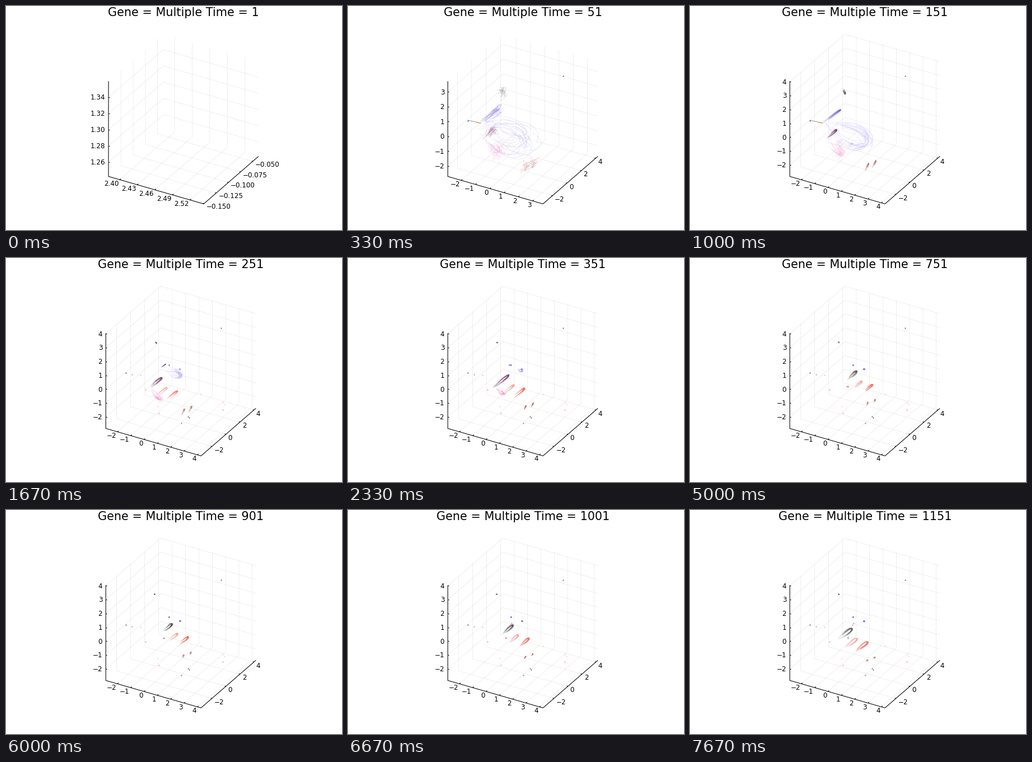
These frames come from a looping animation (600x400 px, 8000 ms). A matplotlib script:

```python
import numpy as np
import matplotlib.pyplot as plt
from matplotlib.animation import FuncAnimation
from matplotlib.collections import LineCollection

W, H = 600, 400
LOOP, STEPS, TICK = 8000, 24, 50  # ms per loop, pictures per loop, ms per frame
PT = 0.72  # points per pixel at 100 dpi
plt.rcParams["font.family"] = "DejaVu Sans"

fig = plt.figure(figsize=(6, 4), dpi=100, facecolor="white")
ax = fig.add_axes([0, 0, 1, 1])

# Screen vectors of the box edges
EX, EY, EZ = np.array([170, 49]), np.array([98, -85]), np.array([0, -170])


def ticks(start, step, count, digits=0):
    return [f"{start + step * i:.{digits}f}".replace("-", "\u2212") for i in range(count)]


def axis_specs(k):
    """Labels, offset and spacing (pixels along the edge) for x, y and z."""
    if k == 0:
        return ((ticks(2.40, 0.03, 5, 2), 20, 31.4),
                (ticks(-0.150, 0.025, 5, 3), 0.5, 21.8),
                (ticks(1.26, 0.02, 5, 2), 25.5, 29))
    if k < 3:
        return ((ticks(-2, 1, 6), 24, 25.5),
                (ticks(-2, 2, 4), 15 + 2 * k, 26 - k / 3),
                (ticks(-2, 1, 6), 17 + 1.5 * k, 27 - k / 2))
    return ((ticks(-2, 1, 7), 20.7, 23.8),
            (ticks(-2, 2, 4), 19.5, 25),
            (ticks(-2, 1, 7), 20.5, 24.75))


def draw_box(k):
    origin = np.array([183.0 if k == 0 else 178.2, 304.4])
    front, back = origin + EX, origin + EY
    x_axis, y_axis, z_axis = axis_specs(k)
    grid, marks = [], []

    def label(p, text, dx, dy, ha):
        ax.text(p[0] + dx, p[1] + dy + 4.3, text, ha=ha, va="baseline",
                fontsize=11.85 * PT)

    def steps(axis, edge, length):
        labels, offset, spacing = axis
        for i, text in enumerate(labels):
            yield text, edge * (offset + spacing * i) / length

    for text, d in steps(x_axis, EX, 170):
        p = origin + d
        grid.append([p, back + d, back + d + EZ])
        marks.append([p, p + EY * 0.02])
        label(p, text, -2, 6.6, "right")
    for text, d in steps(y_axis, EY, 98):
        p = front + d
        grid.append([p, origin + d, origin + d + EZ])
        marks.append([p, p - EX * 0.012])
        label(p, text, 4, 5 if k == 0 else 6, "left")
    for text, d in steps(z_axis, EZ, 170):
        p = origin + d
        grid.append([p, back + d, back + EX + d])
        marks.append([p, p + [2, 0]])
        label(p, text, -6, 0, "right")

    outline = [origin + EZ, origin, front, front + EY]
    ax.add_collection(LineCollection(grid, colors="black", alpha=0.1,
                                     linewidths=0.6 * PT, zorder=1))
    ax.add_collection(LineCollection([outline] + marks, colors="black",
                                     linewidths=1.05 * PT, zorder=4))
    ax.text(origin[0] + 134.3, 18.4, f"Gene = Multiple Time = {1 + 50 * k}",
            ha="center", va="baseline", fontsize=20.74 * PT)


def decay(k, tau):
    return np.exp(-max(k - 3, 0) / tau)


def mix(start, end, amount):
    return np.array(end) + (np.array(start) - end) * amount


def smear(k, color, alpha, tail, tip, width, bend=0, n=30, spread=0.8):
    """Jittered arcs of a teardrop that runs from tail to tip and back."""
    rng = np.random.default_rng(n + int(width * 10) + k)
    if k < 3:
        spread += 4 / k
    arcs = []
    for _ in range(n):
        a = np.array(tail) + rng.normal(0, spread, 2)
        b = np.array(tip) + rng.normal(0, spread, 2)
        axis = b - a
        normal = np.array([axis[1], -axis[0]]) / (np.hypot(*axis) + 1e-6)
        half = normal * width / 0.577 * rng.uniform(0.4, 1.05)
        mid = a + axis * 4 / 3 + normal * bend
        start = rng.uniform(0, 0.6)
        t = np.linspace(start, start + 0.4, 12)[:, None]
        arcs.append(a * ((1 - t) ** 3 + t ** 3)
                    + 3 * t * (1 - t) ** 2 * (mid + half)
                    + 3 * t * t * (1 - t) * (mid - half))
    ax.add_collection(LineCollection(arcs, colors=color, alpha=alpha,
                                     linewidths=0.9 * PT, zorder=2))


def draw_cycles(k):
    """Cells on the shared cycle: copies of one moving leaf, shifted apart."""
    late = 0.15 * max(k - 15, 0) ** 2
    tip = np.array([300 - 37 * decay(k, 3.5) - late, 203 + 20 * decay(k, 4.5) + 1.1 * late])
    length = 22 + 13 * np.exp(-(k - 7) ** 2 / 8) + 0.9 * late
    reach = length * np.array([-0.82, 0.57])
    width = 5 + late / 4
    purple = np.clip((14 - k) / 4, 0, 1)
    smear(k, mix((0.40, 0.10, 0.35), (0.18, 0.18, 0.18), purple), 0.16,
          tip + reach, tip, width, 3, n=36)

    shown = 1.1 - decay(k, 2)
    for color, shift, alpha in (("#f07868", (9, 17), 0.11), ("#f03828", (28, 23), 0.15)):
        smear(k, color, alpha * shown, tip + shift + reach * 0.85, tip + shift,
              width * 0.9, 2)

    half = np.array([-2, 4]) * (0.5 + 1.2 * decay(k, 6))
    for x, dy in ((316, 56), (329, 51)):
        center = np.array([x, tip[1] + dy + 9 * decay(k, 2)])
        smear(k, "#a03028", 0.2, center + half, center - half, 2, n=14, spread=0.6)


def draw_settling(k):
    """Clouds that shrink into their resting points."""
    fast, slow = decay(k, 1.5), decay(k, 5)
    smear(k, "#f060b0", 0.14, mix((247, 236), (282, 229), slow), mix((270, 266), (283, 228), slow),
          11 * slow, 2, spread=0.3 + 3 * slow)
    smear(k, "#8878f0", 0.16, mix((237, 209), (309, 198), fast), mix((318, 243), (311, 197), fast),
          2 + 42 * fast, -3, spread=0.6 + 5 * fast)
    smear(k, "#6858e0", 0.2, mix((237, 209), (291, 191), fast), mix((269, 185), (291, 191), fast),
          3 * fast, spread=0.4)
    smear(k, "#384840", 0.2, mix((273, 147), (264, 150.5), fast),
          mix((277, 157), (266, 150.5), fast), 1 + 2 * fast, spread=0.4)
    if k < 5:
        ax.plot([214, 237], [204, 209], color="#7080a0", lw=0.8 * PT, zorder=2)
        ax.plot([230, 236], [208, 209], color="#f0a030", lw=1.3 * PT, zorder=3)


# Resting points by first picture and color
DOTS = {
    (1, "#4c4c10"): [(384, 125)],
    (1, "#106030"): [(214, 205)],
    (4, "#60b070"): [(224.5, 208)],
    (4, "#e8b080"): [(240, 209)],
    (5, "#2018b0"): [(291, 191), (310, 198)],
    (5, "#f08088"): [(249, 235), (272.5, 277), (387, 271)],
    (5, "#f8c0c0"): [(271, 265), (387, 258), (390, 261), (348, 243)],
    (5, "#806060"): [(313, 295), (325, 283)],
    (5, "#404040"): [(327, 285)],
    (14, "#e06080"): [(282, 228.5), (289.5, 204.5), (292, 201.5)],
}


def draw_dots(k):
    for (start, color), points in DOTS.items():
        if k >= start:
            ax.plot(*zip(*points), "s", ms=1.7 * PT, color=color, mew=0, zorder=3)


def draw(frame):
    # A picture changes in the frame that contains its start time.
    at = frame * TICK + TICK - 10
    k = at * STEPS // LOOP
    if frame and k == (at - TICK) * STEPS // LOOP:
        return
    ax.clear()
    ax.set(xlim=(0, W), ylim=(H, 0))
    ax.axis("off")
    draw_box(k)
    if k:
        draw_cycles(k)
        draw_settling(k)
        draw_dots(k)


anim = FuncAnimation(fig, draw, frames=LOOP // TICK, interval=TICK, repeat=True,
                     repeat_delay=0, init_func=lambda: None)
plt.show()
```
